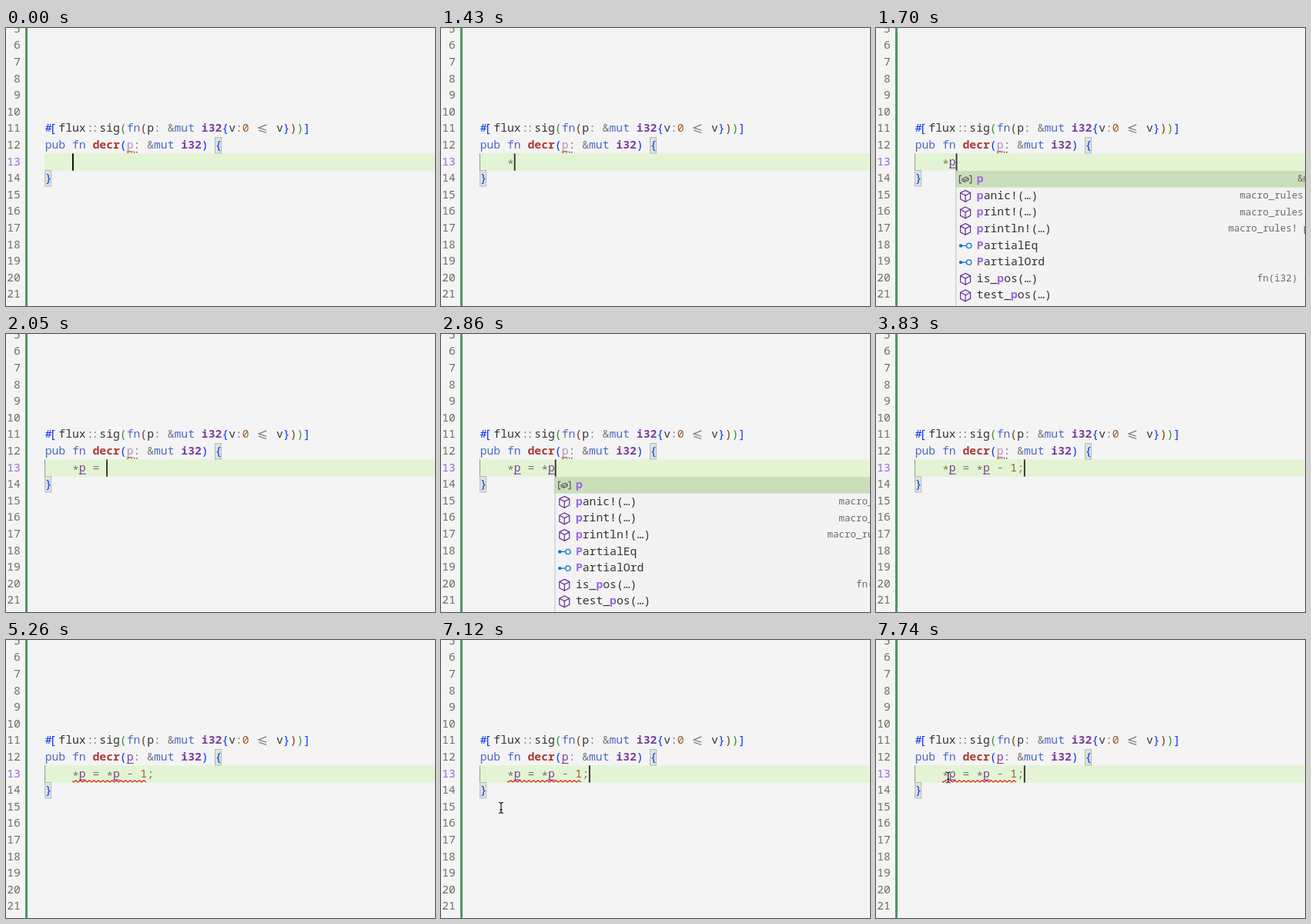
An HTML page with a canvas that plays this animation: 557 by 362 pixels, repeating every 8000 ms.

```html
<!DOCTYPE html>
<html lang="en">
<head>
<meta charset="utf-8">
<title>Editor typing</title>
<style>
html, body { margin: 0; width: 100%; height: 100%; overflow: hidden; background: #f4f4f4; }
canvas { display: block; width: 557px; height: 362px; }
</style>
</head>
<body>
<canvas id="stage"></canvas>
<script>
const W = 557, H = 362, LOOP = 8000;
const CH = 8.832, ROW = 21.6, LEFT = 50.7;
const SIZE = 14.72, SMALL = 12.5;
const C = {
  bg: '#f4f4f4', band: '#e3f4d4', text: '#333333', dim: '#777777', key: '#4b69c6',
  type: '#7a3e9d', fn: '#aa3731', num: '#9c5d27', b1: '#0431fa', b2: '#319331',
  b3: '#7b3814', match: '#9769dc', cube: '#652d90', link: '#007acc', caret: '#383234'
};

const canvas = document.getElementById('stage');
const g = canvas.getContext('2d');
const dpr = window.devicePixelRatio || 1;
canvas.width = Math.round(W * dpr);
canvas.height = Math.round(H * dpr);

const mid = n => 174.2 + (n - 13) * ROW;
const col = i => LEFT + i * CH;

function text(s, x, y, color, bold, size = SIZE) {
  g.font = `${bold ? 700 : 500} ${size}px "Noto Sans Mono", "DejaVu Sans Mono", monospace`;
  g.fillStyle = color;
  g.fillText(s, x, y + size / 3 - 0.5);
}

function rect(x, y, w, h, color) {
  g.fillStyle = color;
  g.fillRect(x, y, w, h);
}

function path(points, color, width = 1, close = false) {
  g.beginPath();
  points.forEach(([x, y], i) => i ? g.lineTo(x, y) : g.moveTo(x, y));
  if (close) g.closePath();
  g.strokeStyle = color;
  g.lineWidth = width;
  g.stroke();
}

function disc(x, y, r, color, hollow) {
  g.beginPath();
  g.arc(x, y, r, 0, 7);
  g.fillStyle = g.strokeStyle = color;
  g.lineWidth = 1.3;
  hollow ? g.stroke() : g.fill();
}

function wave(x0, x1, y, color) {
  const pts = [[x0, y]];
  for (let x = x0 + 1.5, down = 1; x <= x1; x += 2.95, down ^= 1) pts.push([x, y + (down ? 1.2 : -1.2)]);
  path(pts, color, 1.2);
}

// Each token: [column, string, color, bold, dx]
function tokens(list, y) {
  for (const [i, s, color, bold, dx = 0] of list) text(s, col(i) + dx, y, color, bold);
}

const ATTR = [
  [0, '#', C.b1], [1, '[', C.b1, false, -3], [2, 'flux', C.text],
  [6, ':', C.dim, false, 1.2], [7, ':', C.dim, false, -1.2], [8, 'sig', C.text],
  [11, '(', C.b2], [12, 'fn', C.key], [14, '(', C.b3], [15, 'p', C.text], [16, ':', C.dim],
  [18, '&', C.dim], [19, 'mut', C.key], [23, 'i32', C.type, true], [26, '{', C.b1],
  [27, 'v', C.text], [28, ':', C.dim], [29, '0', C.num], [34, 'v', C.text],
  [35, '}', C.b1], [36, ')', C.b3], [37, ')', C.b2], [38, ']', C.b1]
];
const HEAD = [
  [0, 'pub', C.key], [4, 'fn', C.key], [7, 'decr', C.fn, true], [11, '(', C.b1],
  [13, ':', C.dim], [15, '&', C.dim], [16, 'mut', C.key], [20, 'i32', C.type, true],
  [23, ')', C.b1], [25, '{', C.b1]
];

const BODY = '*p = *p - 1;';
const KEYS = [1430, 1610, 1790, 1970, 2050, 2590, 2860, 3030, 3300, 3380, 3560, 3830];
const OFF = [[440, 890], [4270, 4810], [5260, 5800], [6340, 6790], [7300, 7740]];
const SOLID = 4720, ERROR = 4990;
const BAND_TOP = mid(13) - ROW / 2, BAND_H = 22.3;

function bracketBox(i, n) {
  const x = col(i), y = Math.round(mid(n) - ROW / 2) + 0.5;
  rect(x, y, 8, 20.5, '#dbe5db');
  g.strokeStyle = '#b9b9b9';
  g.lineWidth = 1;
  g.strokeRect(x, y, 8, 20.5);
}

function underline(i, n, color) {
  rect(col(i), mid(n) + 7.4, CH, 1.1, color);
}

function drawCode(t, typed) {
  rect(50, BAND_TOP, W, BAND_H, C.band);
  if (typed) rect(50, BAND_TOP, 1, BAND_H, '#92998d');
  bracketBox(25, 12);
  bracketBox(0, 14);
  rect(25, 0, 3, H, '#48985d');
  for (let n = 5; n <= 21; n++) {
    text(String(n).padStart(2), 1.2, mid(n), n === 13 ? C.match : '#6d705b');
  }

  tokens(ATTR, mid(11));
  const y = mid(11) - 0.3, x = col(31) + 3.6;
  path([[x + 10, y - 4.8], [x, y - 0.8], [x + 10, y + 2.6]], C.dim, 1.2);
  path([[x, y + 2.4], [x + 10, y + 5.8]], C.dim, 1.2);

  tokens(HEAD, mid(12));
  const solid = t >= SOLID;
  g.globalAlpha = solid ? 1 : 0.55;
  text('p', col(12), mid(12), C.type);
  underline(12, 12, C.type);
  g.globalAlpha = 1;
  if (!solid) {
    wave(col(12), col(12) + 8, mid(12) + 9, '#bf7a13');
    for (const dot of [166, 169]) rect(dot, mid(12) + 8.4, 1.5, 1.5, '#555555');
  }
  text('}', col(0), mid(14), C.b1);

  for (let i = 0; i < typed; i++) {
    const c = BODY[i];
    const color = c === 'p' ? C.type : c === '1' ? C.num : C.dim;
    text(c, col(4 + i), mid(13) + (c === '*' ? 3 : 0), color);
    if (c === 'p' && t >= 1700) underline(4 + i, 13, C.type);
  }
  if (t >= ERROR) wave(col(4), col(15), 183.9, '#e51400');
  if (!OFF.some(([a, b]) => t >= a && t < b)) {
    rect(col(4 + typed) - 0.1, BAND_TOP, 1.9, BAND_H, typed ? C.caret : '#000000');
  }
}

function cube(x, y) {
  const p = (a, b) => [x + a, y + b];
  path([p(0, -7.3), p(6.5, -4), p(6.5, 4), p(0, 7.5), p(-6.5, 4), p(-6.5, -4)], C.cube, 1.2, true);
  path([p(-6.5, -4), p(0, -0.6), p(6.5, -4)], C.cube, 1.2);
  path([p(0, -0.6), p(0, 7.5)], C.cube, 1.2);
}

const ICONS = {
  local(x, y) {
    for (const d of [-1, 1]) {
      path([[x + d * 5, y - 4.8], [x + d * 7.6, y - 4.8], [x + d * 7.6, y + 4.8], [x + d * 5, y + 4.8]], '#555', 1.2);
    }
    path([[x - 4, y - 0.5], [x + 1, y - 3], [x + 4, y - 1.5], [x + 4, y + 1], [x - 1, y + 3.4], [x - 4, y + 1.8]], '#555', 1.1, true);
    path([[x - 4, y - 0.5], [x - 1, y + 0.9], [x + 4, y - 1.5]], '#555', 1);
    path([[x - 1, y + 0.9], [x - 1, y + 3.4]], '#555', 1);
  },
  macro: cube,
  trait(x, y) {
    disc(x - 6, y, 2.2, C.link);
    path([[x - 5, y], [x + 1.3, y]], C.link, 1.3);
    disc(x + 4.6, y, 3.2, C.link, true);
  }
};

// [icon, label, matched column, detail]
const ITEMS = [
  ['local', 'p', 0, '&mut i32'],
  ['macro', 'panic!(…)', 0, 'macro_rules! panic'],
  ['macro', 'print!(…)', 0, 'macro_rules! print'],
  ['macro', 'println!(…)', 0, 'macro_rules! println'],
  ['trait', 'PartialEq', 0, ''],
  ['trait', 'PartialOrd', 0, ''],
  ['macro', 'is_pos(…)', 3, 'fn(i32) -> bool'],
  ['macro', 'test_pos(…)', 5, '']
];

function drawMenu(x) {
  const top = mid(14) - ROW / 2 + 1;
  rect(x, top, W, H, '#f3f3f3');
  rect(x, top, W, ROW, '#cadeb9');
  rect(x, top, 1, H, '#c2c5c0');
  ITEMS.forEach(([icon, label, hit, detail], i) => {
    const y = top + ROW * (i + 0.5);
    ICONS[icon](x + 12.8, y + 0.3);
    [...label].forEach((c, k) =>
      text(c, x + 27.5 + k * CH, y, k === hit ? C.match : C.text, k === hit));
    text(detail, x + 504 - detail.length * SMALL * 0.6, y, '#6c6c6c', false, SMALL);
  });
}

// Pointer way points: [time, x, y]
const WAY = [[6600, 90, 325], [6860, 80, 268], [7120, 78, 218.4], [7390, 87.5, 190], [7740, 94, 178.5]];

function pointerAt(t) {
  const s = 6600 + Math.floor((t - 6600) / 86.6 + 0.01) * 86.6;
  const i = WAY.findIndex(w => w[0] > s);
  if (i < 0) return WAY[WAY.length - 1].slice(1);
  const a = WAY[Math.max(0, i - 1)], b = WAY[i];
  const u = Math.max(0, (s - a[0]) / (b[0] - a[0]));
  return [a[1] + (b[1] - a[1]) * u, a[2] + (b[2] - a[2]) * u];
}

function drawPointer([x, y]) {
  for (const [color, w] of [['#ffffff', 3], ['#111111', 1.2]]) {
    path([[x - 3, y - 7], [x - 1, y - 6.6], [x, y - 5.5], [x + 1, y - 6.6], [x + 3, y - 7]], color, w);
    path([[x, y - 5.5], [x, y + 5.5]], color, w);
    path([[x - 3, y + 7], [x - 1, y + 6.6], [x, y + 5.5], [x + 1, y + 6.6], [x + 3, y + 7]], color, w);
    path([[x - 1.8, y + 2.5], [x + 1.8, y + 2.5]], color, w);
  }
}

function draw(t) {
  g.setTransform(dpr, 0, 0, dpr, 0, 0);
  rect(0, 0, W, H, C.bg);
  const typed = KEYS.filter(k => t >= k).length;
  drawCode(t, typed);
  if (t >= 1700 && t < 1790) drawMenu(103.3);
  if (t >= 2860 && t < 3030) drawMenu(103.3 + 5 * CH);
  if (t >= 6600) drawPointer(pointerAt(t));
}

let start;
function tick(now) {
  start ??= now;
  draw((now - start) % LOOP);
  requestAnimationFrame(tick);
}
draw(0);
requestAnimationFrame(tick);
</script>
</body>
</html>
```
